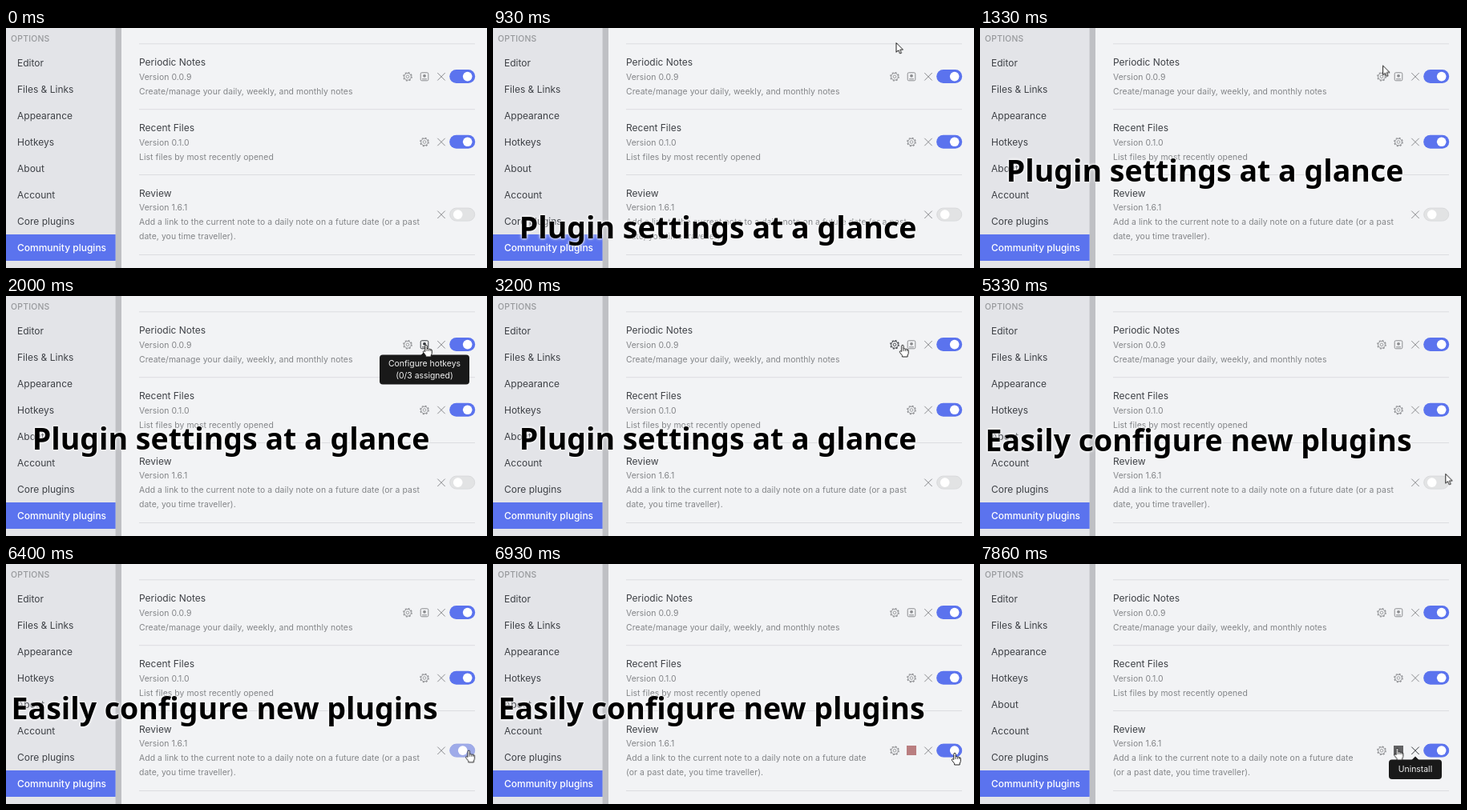
Recreate the animation shown at these times as an HTML page. Size 600x300 px, loop 8000 ms.

```html
<!DOCTYPE html>
<html lang="en">
<head>
<meta charset="utf-8">
<title>Plugin settings</title>
<style>
html, body { margin: 0; width: 100%; height: 100%; overflow: hidden; background: #f2f3f5; }
svg { display: block; width: 600px; height: 300px; font: 10.4px Inter, sans-serif; }

.nav, .title { font-size: 12px; fill: #3e4146; }
.nav .active { font-weight: 500; fill: #fff; }
.muted { letter-spacing: .07px; fill: #838588; }
.group { font-weight: 500; letter-spacing: .25px; fill: #96989b; }
.accent { fill: #5b73ee; }
.line { fill: #dcdde0; }
.icon { color: #8b8c8f; }
.tip rect, .tip path { fill: #191919; }
.tip text { fill: #f2f2f2; text-anchor: middle; }
.caption {
  font: 700 37.5px "Noto Sans", sans-serif;
  text-shadow: 0 0 3px #fff, 0 0 4px #fff;
}

/* The clock has 60 ticks of 1.6667% each. */
.a { animation: 8s -7ms infinite step-end; }
.cursor { animation-name: move; }
.arrow { animation-name: arrow; }
.hand { animation-name: hand; }
.gear1 { animation-name: gear1; }
.keys1 { animation-name: keys1; }
.tip1 { animation-name: tip1; }
.tip2 { animation-name: tip2; }
.cross { animation-name: cross; }
.keys3 { animation-name: keys3; }
.off { animation-name: off; }
.on { animation-name: on; }
.track { animation-name: track; }
.knob { animation-name: knob; }
.cap1 { animation-name: cap1; }
.cap2 { animation-name: cap2; }

@keyframes move {
  0%, 8.333% { transform: translate(500px, 9px); animation-timing-function: steps(2); }
  11.667% { transform: translate(502.5px, 18px); animation-timing-function: steps(4); }
  18.333% { transform: translate(502px, 56px); animation-timing-function: steps(4); }
  25% { transform: translate(524px, 61px); }
  33.333% { transform: translate(524px, 61px); animation-timing-function: steps(7); }
  45% { transform: translate(501px, 61px); }
  55% { transform: translate(497.5px, 76px); animation-timing-function: steps(7); }
  66.667% { transform: translate(580.3px, 221.8px); animation-timing-function: steps(3); }
  71.667% { transform: translate(577.5px, 232px); }
  78.333% { transform: translate(577.5px, 232px); animation-timing-function: steps(5); }
  86.667% { transform: translate(576px, 236px); }
  93.333% { transform: translate(576px, 236px); animation-timing-function: steps(3); }
  98.333%, 100% { transform: translate(520.5px, 230px); }
}
@keyframes arrow {
  0% { opacity: 0; }
  8.333% { opacity: 1; }
  18.333% { opacity: 0; }
  55% { opacity: 1; }
  70%, 100% { opacity: 0; }
}
@keyframes hand {
  0% { opacity: 0; }
  18.333% { opacity: 1; }
  55% { opacity: 0; }
  70%, 100% { opacity: 1; }
}
@keyframes gear1 {
  0% { color: #8b8c8f; }
  18.333% { color: #33373c; }
  21.667% { color: #8b8c8f; }
  40% { color: #33373c; }
  55%, 100% { color: #8b8c8f; }
}
@keyframes keys1 {
  0% { color: #8b8c8f; }
  23.333% { color: #33373c; }
  36.667%, 100% { color: #8b8c8f; }
}
@keyframes tip1 {
  0% { opacity: 0; }
  23.333% { opacity: 1; }
  36.667%, 100% { opacity: 0; }
}
@keyframes tip2 {
  0% { opacity: 0; }
  96.667%, 100% { opacity: 1; }
}
@keyframes cross {
  0% { color: #8b8c8f; }
  96.667%, 100% { color: #33373c; }
}
@keyframes keys3 {
  0% { fill: #b97e80; }
  98.333%, 100% { fill: #626264; }
}
@keyframes off {
  0% { opacity: 1; }
  81.667%, 100% { opacity: 0; }
}
@keyframes on {
  0% { opacity: 0; }
  81.667%, 100% { opacity: 1; }
}
@keyframes track {
  0%, 78.333% { fill: #e2e3e4; stroke: #d9dadc; animation-timing-function: steps(2); }
  81.667%, 100% { fill: #5b73ee; stroke: #5b73ee; }
}
@keyframes knob {
  0%, 78.333% { transform: translateX(-12px); animation-timing-function: steps(2); }
  81.667%, 100% { transform: translateX(0); }
}
@keyframes cap1 {
  0% { transform: translateY(142px); opacity: 0; }
  10% { transform: translateY(142px); opacity: 1; animation-timing-function: steps(2); }
  13.333% { transform: translateY(0); opacity: 1; }
  65%, 100% { transform: translateY(0); opacity: 0; }
}
@keyframes cap2 {
  0% { opacity: 0; }
  65% { opacity: 1; }
  95%, 100% { opacity: 0; }
}
</style>
</head>
<body>
<svg viewBox="0 0 600 300">
  <defs>
    <g id="gear" fill="none" stroke="currentColor">
      <circle r="4.3" stroke-width=".9"/>
      <circle r="5.2" stroke-width="1.2" stroke-dasharray="2.1 1.984"/>
      <circle r="1.8" stroke-width=".8"/>
    </g>
    <g id="keys">
      <rect x="-4.8" y="-5" width="9.6" height="10" rx="1.5" fill="none" stroke="currentColor"/>
      <circle cy="-1" r="1.9" fill="currentColor"/>
      <path d="M-3 3H3" stroke="currentColor"/>
    </g>
    <path id="x" d="M-4.7-4.7 4.7 4.7M4.7-4.7-4.7 4.7" stroke="currentColor"/>
    <g id="toggle">
      <rect class="accent" x="-16" y="-8.5" width="32" height="17" rx="8.5"/>
      <circle cx="6.5" r="5.8" fill="#fff"/>
    </g>
  </defs>

  <rect width="600" height="300" fill="#f2f3f5"/>
  <rect width="144" height="300" fill="#bfc0c4"/>
  <rect width="136.6" height="300" fill="#e3e4e8"/>
  <rect class="accent" y="258" width="136.6" height="33"/>
  <text class="group" x="6" y="17.3">OPTIONS</text>
  <g class="nav">
    <text x="14" y="48.2">Editor</text>
    <text x="14" y="81.2">Files &amp; Links</text>
    <text x="14" y="114.2">Appearance</text>
    <text x="14" y="147.2">Hotkeys</text>
    <text x="14" y="180.2">About</text>
    <text x="14" y="213.2">Account</text>
    <text x="14" y="246.2">Core plugins</text>
    <text class="active" x="14" y="279.2">Community plugins</text>
  </g>

  <g class="line">
    <rect x="166" y="19.3" width="419" height="1"/>
    <rect x="166" y="101.2" width="419" height="1"/>
    <rect x="166" y="183" width="419" height="1"/>
    <rect x="166" y="283" width="419" height="1"/>
  </g>

  <g>
    <text class="title" x="166" y="47.2">Periodic Notes</text>
    <text class="muted" x="166" y="64.8">Version 0.0.9</text>
    <text class="muted" x="166" y="82.7">Create/manage your daily, weekly, and monthly notes</text>
    <g class="icon">
      <g class="a gear1"><use href="#gear" x="501" y="60.8"/></g>
      <g class="a keys1"><use href="#keys" x="522" y="60.8"/></g>
      <use href="#x" x="543" y="60.8"/>
    </g>
    <use href="#toggle" x="569.2" y="60.6"/>
  </g>

  <g>
    <text class="title" x="166" y="129.2">Recent Files</text>
    <text class="muted" x="166" y="146.6">Version 0.1.0</text>
    <text class="muted" x="166" y="164.5">List files by most recently opened</text>
    <g class="icon">
      <use href="#gear" x="522" y="142.5"/>
      <use href="#x" x="543" y="142.5"/>
    </g>
    <use href="#toggle" x="569.2" y="142.3"/>
  </g>

  <g>
    <text class="title" x="166" y="211">Review</text>
    <text class="muted" x="166" y="228.4">Version 1.6.1</text>
    <g class="a off muted">
      <text x="166" y="246.3">Add a link to the current note to a daily note on a future date (or a past</text>
      <text x="166" y="264.3">date, you time traveller).</text>
    </g>
    <g class="a on">
      <g class="muted">
        <text x="166" y="246.3">Add a link to the current note to a daily note on a future date</text>
        <text x="166" y="264.3">(or a past date, you time traveller).</text>
      </g>
      <use class="icon" href="#gear" x="501" y="233.3"/>
      <rect class="a keys3" x="516" y="227" width="12" height="12"/>
    </g>
    <g class="icon"><g class="a cross"><use href="#x" x="543" y="233.3"/></g></g>
    <rect class="a track" x="553.7" y="225.1" width="31" height="16" rx="8"/>
    <circle class="a knob" cx="575.7" cy="233.1" r="5.8" fill="#fff"/>
  </g>

  <g class="a tip tip1">
    <path d="M517 74.5 522 69.5 527 74.5Z"/>
    <rect x="466" y="73.5" width="112" height="37" rx="4"/>
    <text x="522" y="88.2">Configure hotkeys</text>
    <text x="522" y="102.6">(0/3 assigned)</text>
  </g>
  <g class="a tip tip2">
    <path d="M538 245.5 543 240.5 548 245.5Z"/>
    <rect x="510" y="244.5" width="66" height="24.5" rx="4"/>
    <text x="543" y="260.4">Uninstall</text>
  </g>

  <g class="a cursor" fill="#fff" stroke="#222" stroke-linejoin="round">
    <path class="a arrow" d="M.5.5V12.3L3.2 9.8 5.1 14 7 13.2 5.2 9.1H9Z"/>
    <g class="a hand">
      <path d="M-1.2 8.5V1.3Q-1.2.3 0 .3T1.2 1.3V5Q2.5 4.2 3.6 5.4 4.9 4.7 5.8 5.9 7.3 5.5 7.3 7.2V10.2Q7.3 12 6.2 13V15H-.4V13.4L-3.6 9.3Q-4 7.9-2.6 7.7Z"/>
      <path d="M1.2 5V8M3.6 5.4V8M5.8 5.9V8" stroke-width=".8"/>
    </g>
  </g>

  <text class="a caption cap1" x="32.7" y="192">Plugin settings at a glance</text>
  <text class="a caption cap2" x="6.5" y="194.3">Easily configure new plugins</text>
</svg>
</body>
</html>
```
